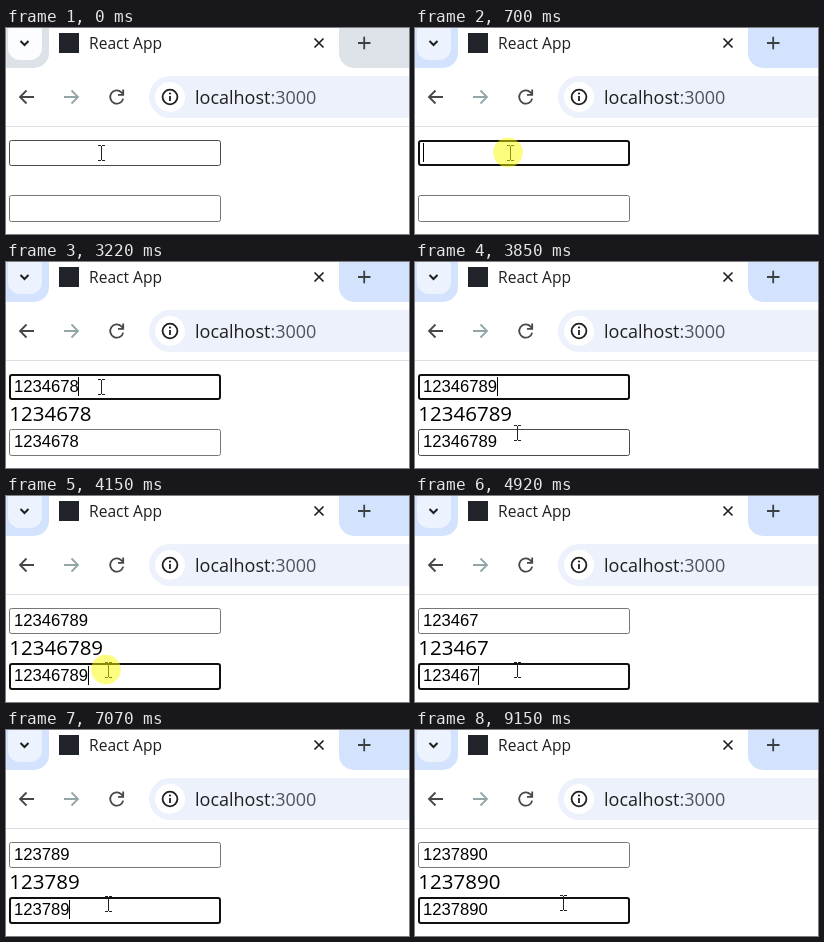
Animation of 403 by 206 pixels, one loop 9370 ms. Source, as an HTML page with a canvas:

```html
<!DOCTYPE html>
<html lang="en">
<head>
<meta charset="utf-8">
<title>React App</title>
<style>
  html, body { margin: 0; width: 100%; height: 100%; overflow: hidden; background: #fff; }
  canvas { display: block; width: 403px; height: 206px; }
</style>
</head>
<body>
<canvas id="stage"></canvas>
<script>
const LOOP = 9370;
const W = 403, H = 206;
const UI_FONT = '"Open Sans", "Noto Sans", sans-serif';
const INPUT_FONT = '16.67px "Liberation Sans", Arial, sans-serif';

const canvas = document.getElementById('stage');
const ctx = canvas.getContext('2d');
const scale = window.devicePixelRatio || 1;
canvas.width = W * scale;
canvas.height = H * scale;

// Each entry holds from its time until the next one.
const values = [
  [0, ''], [1130, '1'], [1430, '12'], [1780, '123'], [2080, '1234'],
  [2580, '12346'], [2860, '123467'], [3220, '1234678'], [3440, '12346789'],
  [4710, '1234678'], [4920, '123467'], [5130, '12346'], [5430, '1234'],
  [5710, '123'], [6570, '1237'], [6790, '12378'], [7070, '123789'], [7570, '1237890']
];
const carets = [
  [0, false], [700, true], [3930, false], [4150, true], [4640, false], [4710, true],
  [5210, false], [5430, true], [5780, false], [6210, true], [8070, false],
  [8590, true], [9150, false]
];
const pointers = [
  [0, [95, 125]], [3510, [95, 129]], [3580, [96, 138]], [3650, [98, 150]],
  [3720, [100, 162]], [3790, [102, 171]], [3860, [102, 174]],
  [7790, [128, 174]], [7850, [148, 173]]
];

function at(track, time) {
  let value = track[0][1];
  for (const [start, v] of track) if (time >= start) value = v;
  return value;
}

function text(str, x, y, font, color) {
  ctx.font = font;
  ctx.fillStyle = color;
  ctx.fillText(str, x, y);
  return x + ctx.measureText(str).width;
}

function roundRect(x, y, w, h, r) {
  ctx.beginPath();
  ctx.roundRect(x, y, w, h, r);
}

function disc(x, y, r, color) {
  ctx.fillStyle = color;
  ctx.beginPath();
  ctx.arc(x, y, r, 0, Math.PI * 2);
  ctx.fill();
}

function line(d, color, width) {
  ctx.strokeStyle = color;
  ctx.lineWidth = width;
  ctx.stroke(new Path2D(d));
}

function drawTabs(active) {
  ctx.fillStyle = active ? '#d3e3fd' : '#dde2e9';
  ctx.fillRect(0, 0, W, 40);

  ctx.fillStyle = active ? '#edf3fe' : '#fcfdfe';
  roundRect(2, -8, 34, 40, 12);
  ctx.fill();
  line('M14.5 13 L18.5 17 L22.5 13', '#1f1f1f', 2);

  ctx.fillStyle = '#fff';
  ctx.fill(new Path2D('M28 40 A15 15 0 0 0 43 25 V0 H333 V25 A15 15 0 0 0 348 40 Z'));
  ctx.fillStyle = '#20232a';
  ctx.fillRect(53, 5, 20, 20);
  text('React App', 83, 21, '15.6px ' + UI_FONT, '#1f1f1f');
  line('M308.5 10.5 L317.5 19.5 M317.5 10.5 L308.5 19.5', '#1f1f1f', 1.7);
  line('M352 15 H364.5 M358.2 8.8 V21.2', '#3c4043', 1.8);
}

function drawToolbar() {
  line('M28 69 H14 M20.5 62.5 L14 69 L20.5 75.5', '#474747', 1.8);
  line('M58 69 H72 M65.5 62.5 L72 69 L65.5 75.5', '#93a5a8', 1.8);
  line('M117.2 70.6 A6.6 6.6 0 1 1 115.4 64.3 L117 66 M117.2 61.5 V66.8 H112', '#474747', 1.8);

  ctx.fillStyle = '#ecf1fb';
  roundRect(143, 48, 300, 42, 21);
  ctx.fill();
  disc(164, 69, 15, '#fff');
  ctx.strokeStyle = '#1f1f1f';
  ctx.lineWidth = 1.8;
  ctx.beginPath();
  ctx.arc(164, 69, 7.4, 0, Math.PI * 2);
  ctx.stroke();
  line('M164 68 V73', '#1f1f1f', 1.8);
  disc(164, 65.5, 1.1, '#1f1f1f');

  const font = '18px ' + UI_FONT;
  const end = text('localhost', 189, 76, font, '#1f1f1f');
  text(':3000', end, 76, font, '#50545a');

  ctx.fillStyle = '#dcdfe3';
  ctx.fillRect(0, 98, W, 1);
}

function drawInput(y, height, value, { focused, hovered, caret }) {
  ctx.lineWidth = focused ? 2 : 1;
  ctx.strokeStyle = focused ? '#101010' : hovered ? '#4a4a4a' : '#767676';
  const inset = ctx.lineWidth / 2;
  roundRect(3 + inset, y + inset, 212 - 2 * inset, height - 2 * inset, 2);
  ctx.stroke();
  const end = text(value, 8, y + 18, INPUT_FONT, '#000');
  if (focused && caret) ctx.fillRect(Math.floor(end), y + 3, 1, 19);
}

function drawPointer([x, y]) {
  ctx.fillStyle = '#222';
  ctx.fillRect(x, y - 7, 1, 14);
  for (const edge of [y - 8, y + 7]) {
    ctx.fillRect(x - 3, edge, 3, 1);
    ctx.fillRect(x + 1, edge, 3, 1);
  }
}

function draw(time) {
  const value = at(values, time);
  const caret = at(carets, time);
  const pointer = at(pointers, time);
  const [px, py] = pointer;
  const active = time >= 700;
  const second = time >= 4150;
  const clicking = (active && time < 790) || (second && time < 4210);

  ctx.setTransform(scale, 0, 0, scale, 0, 0);
  ctx.fillStyle = '#fff';
  ctx.fillRect(0, 0, W, H);
  drawTabs(active);
  drawToolbar();
  drawInput(112, 26, value, { focused: active && !second, hovered: py < 139, caret });
  text(value, 3.3, 159, '20.5px ' + UI_FONT, '#000');
  drawInput(167, 27, value, { focused: second, hovered: py >= 167, caret });
  drawPointer(pointer);
  if (clicking) disc(px - 2, py - 0.5, 14.8, 'rgba(250, 250, 0, 0.5)');
}

const start = performance.now();
function tick() {
  draw((performance.now() - start) % LOOP);
  requestAnimationFrame(tick);
}
tick();
</script>
</body>
</html>
```
